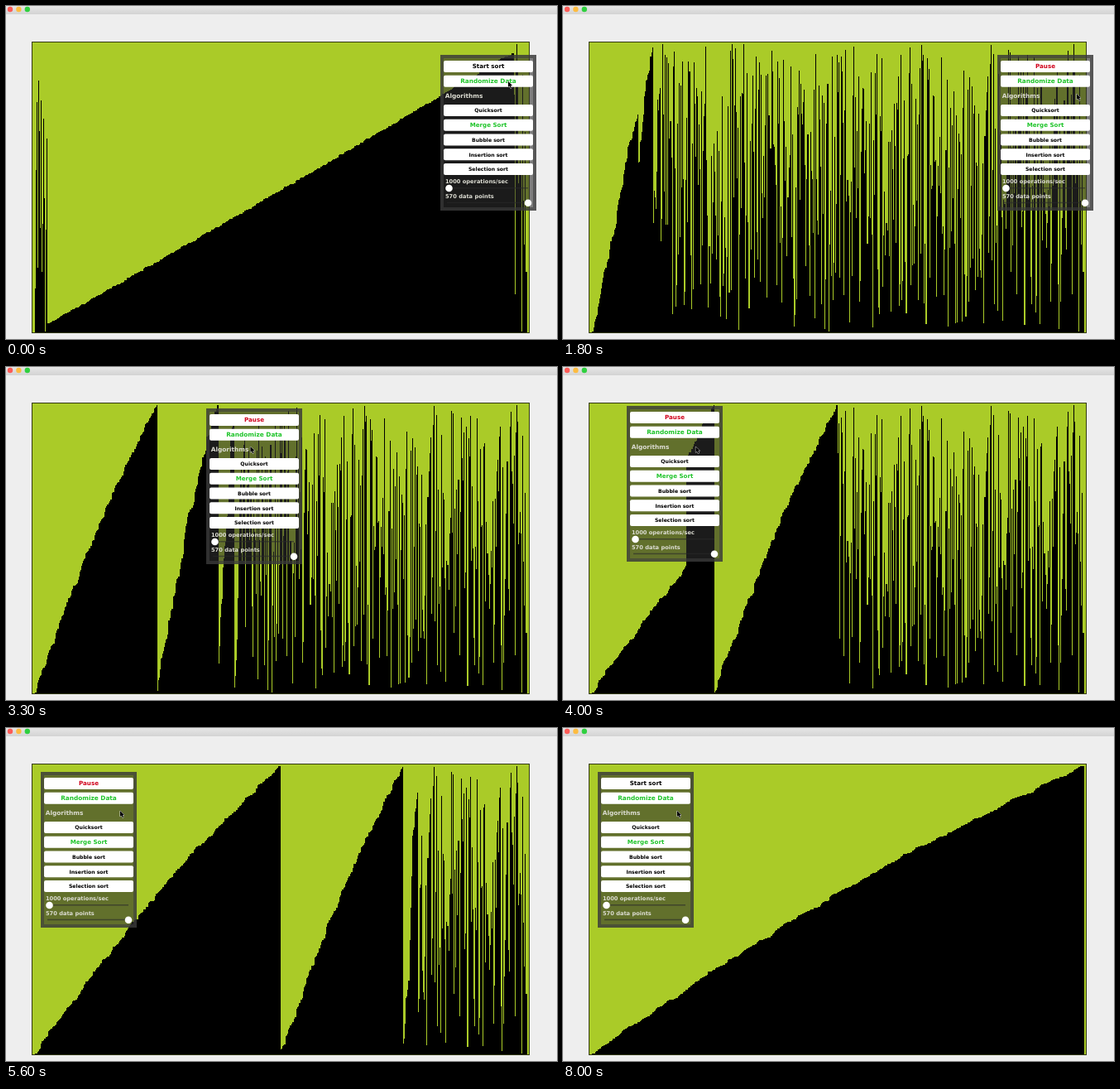
An HTML page with a canvas for the animation above (8.1 s loop, 666 px wide and 402 px high).

```html
<!DOCTYPE html>
<html lang="en">
<head>
<meta charset="utf-8">
<title>Sorting visualizer</title>
<style>
  html, body { margin: 0; width: 100%; height: 100%; overflow: hidden; background: #eee; }
  canvas { display: block; width: 666px; height: 402px; }
</style>
</head>
<body>
<canvas id="stage" width="666" height="402"></canvas>
<script>
const ctx = document.getElementById('stage').getContext('2d');
const LOOP = 8100, STEP = 100, COUNT = 570;
const LEFT = 35, RIGHT = 630, FLOOR = 394;
const GREEN = '#aacb28', TEXT_GREEN = '#1fc42a', LABEL = '#dcdcd2';

let seed = 20177;
const random = () => (seed = (seed * 16807) % 2147483647) / 2147483647;

// Values of a [time, ...values] table at time t
function track(keys, t) {
  let i = 0;
  while (i < keys.length - 2 && t >= keys[i + 1][0]) i++;
  const a = keys[i], b = keys[i + 1];
  const f = Math.min(Math.max((t - a[0]) / (b[0] - a[0]), 0), 1);
  return a.slice(1).map((v, k) => v + (b[k + 1] - v) * f);
}

// Sorted bar tops: a line with a bulge and uneven steps
function spread(n, bulge) {
  return Array.from({ length: n }, (_, i) => {
    const u = Math.min(Math.max((i + random() * 6 - 2.5) / n, 0), 1);
    return 393 - 347 * u - bulge * Math.sin(Math.PI * u);
  }).sort((a, b) => b - a);
}

function shuffle(list) {
  for (let i = list.length - 1; i > 0; i--) {
    const j = Math.floor(random() * (i + 1));
    [list[i], list[j]] = [list[j], list[i]];
  }
  return list;
}

const oldBars = spread(COUNT, -3);
const newBars = [142, 143, 142, 143].flatMap(n => shuffle(spread(n, 20)));

// Every write of the merge sort, in order
const writes = [];
function mergeSort(list, from, to) {
  if (to - from < 2) return;
  const mid = (from + to) >> 1;
  mergeSort(list, from, mid);
  mergeSort(list, mid, to);
  const a = list.slice(from, mid), b = list.slice(mid, to);
  for (let k = from; k < to; k++) {
    const v = !b.length || (a.length && a[0] >= b[0]) ? a.shift() : b.shift();
    list[k] = v;
    writes.push([k, v]);
  }
}
mergeSort(newBars.slice(), 0, COUNT);

const SORT_START = 1232, SORT_END = 7860;
const progress = [[SORT_START, 0], [2700, 1094], [4000, 2163], [6800, 4394], [SORT_END, writes.length]];
const panelPath = [[2200, 525, 59], [2700, 383, 52], [4000, 77, 47], [4500, 42, 53]];
const clickPath = [[300, 607, 91], [1200, 585, 72], [1800, 621, 106]];
const DRAG_LAG = 180;

function barsAt(t) {
  const mixed = 15 + t * 0.8;
  const bars = newBars.map((v, i) => Math.min(i, COUNT - 1 - i) < mixed ? v : oldBars[i]);
  const done = Math.round(track(progress, t)[0]);
  for (const [i, v] of writes.slice(0, done)) bars[i] = v;
  return bars;
}

function rect(x, y, w, h, color) {
  ctx.fillStyle = color;
  ctx.fillRect(x, y, w, h);
}

function disc(x, y, r, color) {
  ctx.fillStyle = color;
  ctx.beginPath();
  ctx.arc(x, y, r, 0, Math.PI * 2);
  ctx.fill();
}

function text(label, x, y, size, color, align) {
  ctx.font = `bold ${size}px "DejaVu Sans", sans-serif`;
  ctx.textAlign = align;
  ctx.fillStyle = color;
  ctx.fillText(label, x, y);
}

function drawWindow() {
  rect(0, 0, 666, 402, '#eeeeee');
  const bar = ctx.createLinearGradient(0, 0, 0, 10);
  bar.addColorStop(0, '#e6e6e6');
  bar.addColorStop(1, '#d3d3d3');
  rect(0, 0, 666, 10, bar);
  ['#fc5b57', '#fdbc40', '#2fd03f'].forEach((c, i) => disc(5 + i * 10.4, 4, 3.2, c));
}

function drawBars(bars) {
  rect(31, 43, 602, 352, '#343b12');
  rect(32, 44, 600, 350, GREEN);
  const edge = i => Math.floor(LEFT + i * (RIGHT - LEFT) / COUNT);
  bars.forEach((top, i) => {
    const y = Math.round(top);
    rect(edge(i), y, edge(i + 1) - edge(i), FLOOR - y, '#000');
  });
}

function button(label, y, size, color) {
  ctx.fillStyle = '#fff';
  ctx.beginPath();
  ctx.roundRect(4, y, 108, 14, 2);
  ctx.fill();
  text(label, 58, y + 9.3, size, color, 'center');
}

function slider(label, y, knob) {
  text(label, 6, y, 6.65, LABEL, 'left');
  rect(8, y + 5, 98, 1.5, 'rgba(40,40,40,.6)');
  disc(knob, y + 6, 4.3, '#fff');
}

function drawPanel(t) {
  const [x, y] = track(panelPath, t).map(Math.round);
  const running = t >= SORT_START && t < SORT_END;
  ctx.save();
  ctx.translate(x, y);
  rect(4, 4, 108, 180, 'rgba(48,48,48,.58)');
  ctx.strokeStyle = 'rgba(58,58,58,.84)';
  ctx.lineWidth = 4;
  ctx.strokeRect(2, 2, 112, 184);
  if (running) button('Pause', 7, 7.1, '#d0021b');
  else button('Start sort', 7, 7.1, '#000');
  button('Randomize Data', 24.7, 7.35, TEXT_GREEN);
  text('Algorithms', 5.7, 52.3, 7.4, LABEL, 'left');
  ['Quicksort', 'Merge Sort', 'Bubble sort', 'Insertion sort', 'Selection sort'].forEach((name, i) => {
    const chosen = name === 'Merge Sort';
    button(name, 60.1 + i * 17.7, chosen ? 7.1 : 6.15, chosen ? TEXT_GREEN : '#000');
  });
  slider('1000 operations/sec', 155, 10.5);
  slider('570 data points', 172.7, 106);
  ctx.restore();
}

// While dragging, the panel trails the pointer
function cursorAt(t) {
  if (t < 1800) return track(clickPath, t);
  const [x, y] = track(panelPath, t + DRAG_LAG);
  return [x + 96, y + 47];
}

function drawCursor(t) {
  ctx.save();
  ctx.translate(...cursorAt(t));
  ctx.beginPath();
  [[0, 0], [0, 7], [1.6, 5.6], [2.8, 8.3], [4, 7.8], [2.9, 5.2], [5, 5]].forEach(p => ctx.lineTo(...p));
  ctx.closePath();
  ctx.strokeStyle = '#ddd';
  ctx.lineWidth = 1;
  ctx.stroke();
  ctx.fillStyle = '#000';
  ctx.fill();
  ctx.restore();
}

function draw(t) {
  drawWindow();
  drawBars(barsAt(t));
  drawPanel(t);
  drawCursor(t);
}

let start, shown = -1;
function tick(now) {
  start ??= now;
  const t = Math.floor(((now - start) % LOOP) / STEP) * STEP;
  if (t !== shown) draw(shown = t);
  requestAnimationFrame(tick);
}
draw(0);
requestAnimationFrame(tick);
</script>
</body>
</html>
```
